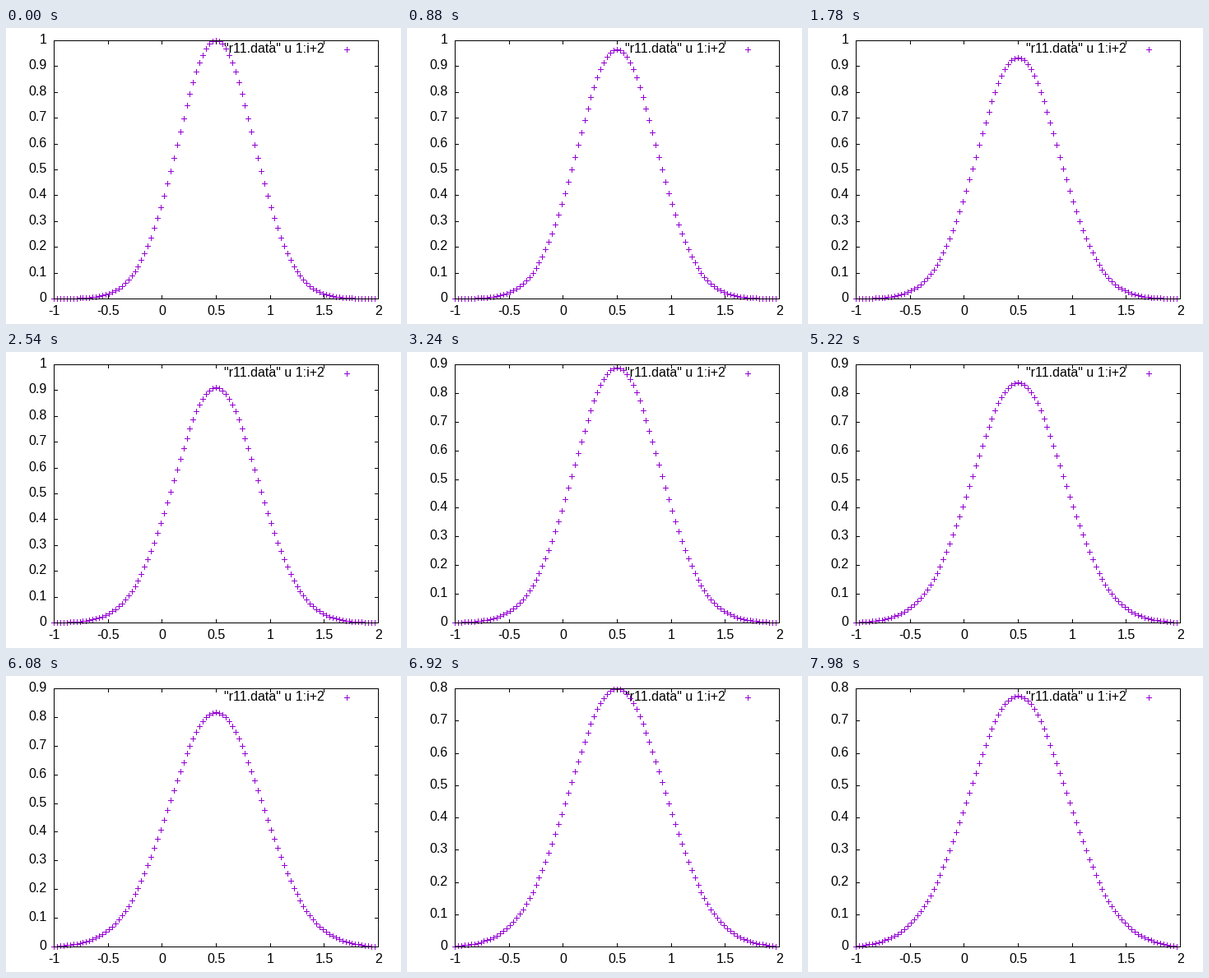
A matplotlib script that plays this animation: 480 px wide and 360 px high, repeating every 8000 ms.

```python
import numpy as np
import matplotlib.pyplot as plt
from matplotlib.animation import FuncAnimation

W, H, DPI = 480, 360, 100
PX = 72 / DPI                      # one pixel in points
LEFT, RIGHT, TOP, BOTTOM = 58, 452, 15, 329
STEPS, POINTS = 400, 100
R = 0.114                          # diffusion number per step
PURPLE = "#9400d3"

plt.rcParams["font.family"] = "Liberation Sans"


def diffuse():
    """Explicit heat equation with fixed ends, one row per step."""
    x = -1 + 0.03 * np.arange(POINTS)
    u = np.exp(-4 * (x - 0.5) ** 2)
    rows = [u]
    for _ in range(STEPS - 1):
        v = u.copy()
        v[1:-1] += R * (u[2:] - 2 * u[1:-1] + u[:-2])
        rows.append(v)
        u = v
    return x, np.array(rows)


def to_px(value):
    return np.floor(value + 0.5)


def join(segments):
    """Chain (x0, y0, x1, y1) segments into one broken line."""
    s = np.asarray(segments, float)
    gap = np.full(len(s), np.nan)
    xs = np.column_stack([s[:, 0], s[:, 2], gap]).ravel()
    ys = np.column_stack([s[:, 1], s[:, 3], gap]).ravel()
    return xs, ys


def hline(x0, x1, y):
    return (x0 - 0.5, y, x1 + 0.5, y)


def vline(x, y0, y1):
    return (x, y0 - 0.5, x, y1 + 0.5)


def crosses(xs, ys):
    return join([hline(x - 3, x + 3, y) for x, y in zip(xs, ys)]
                + [vline(x, y - 3, y + 3) for x, y in zip(xs, ys)])


fig = plt.figure(figsize=(W / DPI, H / DPI), dpi=DPI, facecolor="white")
ax = fig.add_axes([0, 0, 1, 1])
ax.set_xlim(-0.5, W - 0.5)
ax.set_ylim(H - 0.5, -0.5)
ax.axis("off")


def pen(color, z):
    line, = ax.plot([], [], color=color, lw=PX, zorder=z,
                    solid_capstyle="butt", snap=False)
    return line


def label(x, y, text, ha):
    return ax.text(x, y, text, ha=ha, va="baseline", fontsize=16 * PX,
                   color="black", zorder=2)


grid_x, field = diffuse()
mark_x = to_px(LEFT + (RIGHT - LEFT) * (grid_x + 1) / 3)

# Border and x axis
fixed = [hline(LEFT, RIGHT, TOP), hline(LEFT, RIGHT, BOTTOM),
         vline(LEFT, TOP, BOTTOM), vline(RIGHT, TOP, BOTTOM)]
for k in range(7):
    tick = to_px(LEFT + (RIGHT - LEFT) * k / 6)
    fixed += [vline(tick, TOP, TOP + 4), vline(tick, BOTTOM - 4, BOTTOM)]
    label(tick, 348.6, f"{-1 + k / 2:g}", "center")
pen("black", 4).set_data(*join(fixed))

# Key
label(386, 29.6, '"r11.data" u 1:i+2', "right")
pen(PURPLE, 3).set_data(*crosses([414], [26]))

points = pen(PURPLE, 3)
y_ticks = pen("black", 4)
y_labels = [label(49, 0, f"{k / 10:g}", "right") for k in range(11)]


def draw(i):
    u = field[i]
    tenths = int(np.ceil(u.max() * 10 - 1e-9))
    scale = (BOTTOM - TOP) * 10 / tenths
    points.set_data(*crosses(mark_x, to_px(BOTTOM - scale * u)))

    segments = []
    for k, text in enumerate(y_labels):
        text.set_visible(k <= tenths)
        if k <= tenths:
            y = to_px(BOTTOM - scale * k / 10)
            text.set_y(y + 3.6)
            segments += [hline(LEFT, LEFT + 4, y), hline(RIGHT - 4, RIGHT, y)]
    y_ticks.set_data(*join(segments))
    return [points, y_ticks, *y_labels]


anim = FuncAnimation(fig, draw, frames=STEPS, interval=20, repeat=True,
                     repeat_delay=0, blit=False)
plt.show()
```
